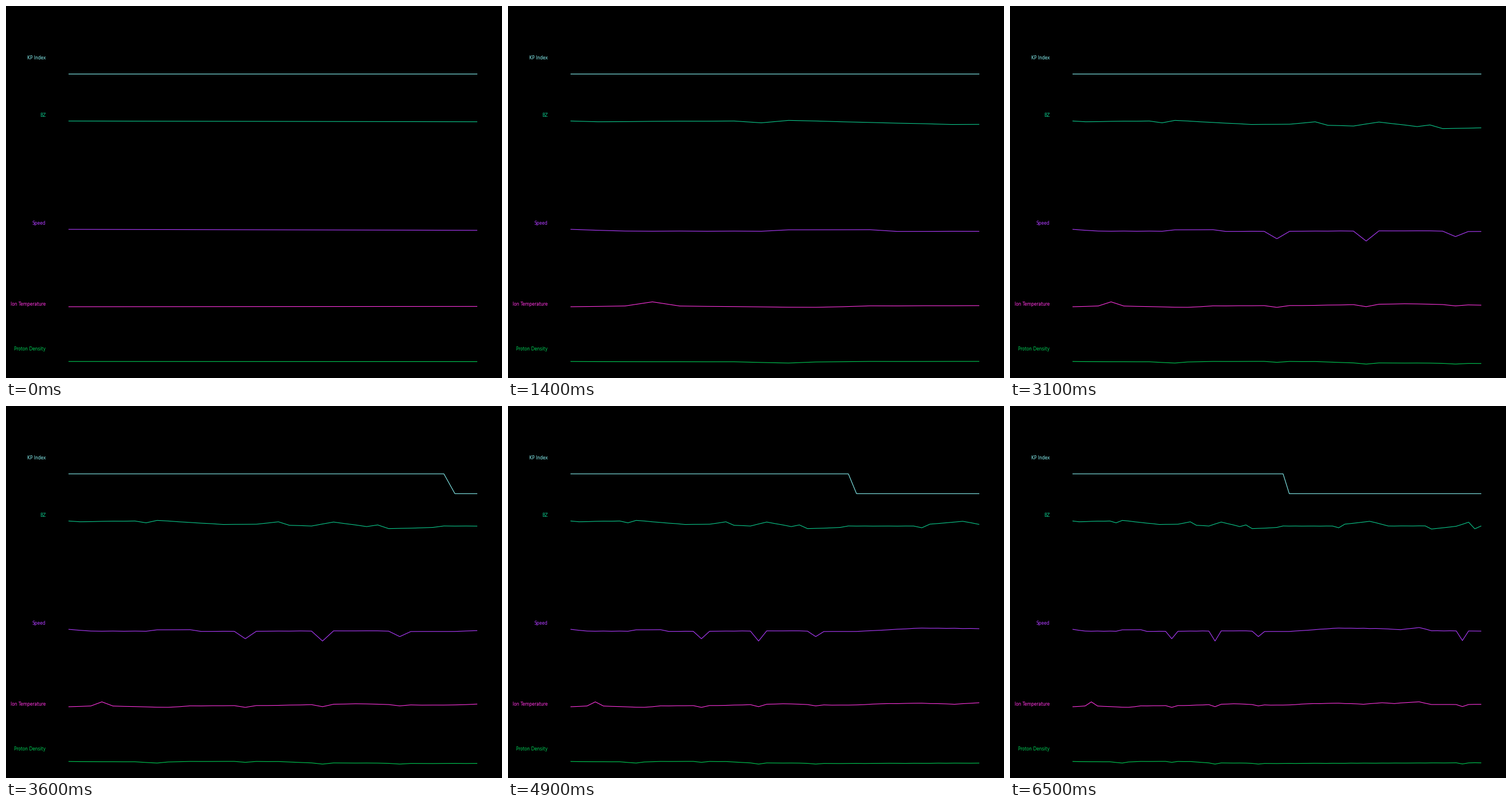
A matplotlib script for the animation above (6.6 s loop, 864 by 648 pixels).

```python
import numpy as np
import matplotlib.pyplot as plt
from matplotlib.animation import FuncAnimation

W, H, DPI = 864, 648, 72
FRAMES, INTERVAL = 66, 100
LEFT, RIGHT = 109.4, 820.4
COUNT = FRAMES + 1

plt.rcParams["font.family"] = "DejaVu Sans"
rng = np.random.default_rng(4)

# Readings where the solar wind drops out, and how deep each drop is.
DROPS = {16: 0.75, 23: 1.0, 30: 0.5, 63: 0.95}


def series(keys, drop=0, noise=0.2):
    """Heights in pixels: straight runs between turns, drops and jitter."""
    y = np.interp(np.arange(COUNT), *zip(*keys))
    for i, depth in DROPS.items():
        y[i] += drop * depth
    return y + rng.uniform(-noise, noise, COUNT)


kp = series([(34, 118.2), (35, 152.7)], noise=0)
bz = series([
    (0, 200.4), (1, 201.5), (6, 200.3), (7, 203.6), (8, 199.3), (14, 206.4),
    (17, 206), (19, 201.7), (20, 207.8), (22, 209.2), (24, 202.2), (27, 210),
    (28, 207.2), (29, 213.6), (33, 211.7), (34, 209.1), (42, 209.2),
    (43, 212.2), (44, 205.8), (48, 200.8), (51, 209), (57, 208.8),
    (58, 214.3), (62, 209.6), (64, 202.2), (65, 213.8), (66, 209.2),
])
speed = series([
    (0, 389), (2, 392.2), (7, 392.2), (8, 390), (11, 389.5), (12, 392.6),
    (28, 391.5), (30, 393), (35, 392.6), (43, 386.8), (50, 387.8),
    (53, 389.8), (56, 385.8), (58, 391.5), (66, 392),
], drop=17.5)
ion = series([
    (0, 523.8), (2, 522.6), (3, 515.2), (4, 522.6), (9, 525), (11, 522.4),
    (18, 521.8), (26, 518.6), (32, 521.2), (35, 520.8), (38, 518.6),
    (43, 517.8), (47, 519.4), (50, 516.9), (52, 518.2), (56, 515.2),
    (58, 520.2), (66, 519.7),
], drop=3.8)
proton = series([
    (0, 619.3), (6, 619.7), (8, 622), (9, 620), (11, 619.1), (19, 619.3),
    (22, 621.6), (28, 622), (30, 622.8), (66, 621.5),
], drop=2, noise=0.15)

# label, baseline, colour, readings
ROWS = [
    ("KP Index", 93, "#86f0f0", kp),
    ("BZ", 193, "#0cc98c", bz),
    ("Speed", 381, "#b03cff", speed),
    ("Ion Temperature", 522, "#ff35e0", ion),
    ("Proton Density", 600, "#00cc55", proton),
]

fig = plt.figure(figsize=(W / DPI, H / DPI), dpi=DPI, facecolor="black")
ax = fig.add_axes([0, 0, 1, 1])
ax.set_xlim(0, W)
ax.set_ylim(H, 0)
ax.axis("off")

lines = []
for label, base, color, _ in ROWS:
    ax.text(69.5, base, label, color=color, size=7.5, ha="right", va="baseline")
    lines += ax.plot([], [], color=color, lw=1.1)


def draw(i):
    """Show the first i + 2 readings, squeezed into the same width."""
    n = i + 2
    x = np.linspace(LEFT, RIGHT, n)
    for line, row in zip(lines, ROWS):
        line.set_data(x, row[3][:n])
    return lines


anim = FuncAnimation(fig, draw, frames=FRAMES, interval=INTERVAL,
                     init_func=lambda: draw(0), repeat=True, repeat_delay=0)
plt.show()
```
